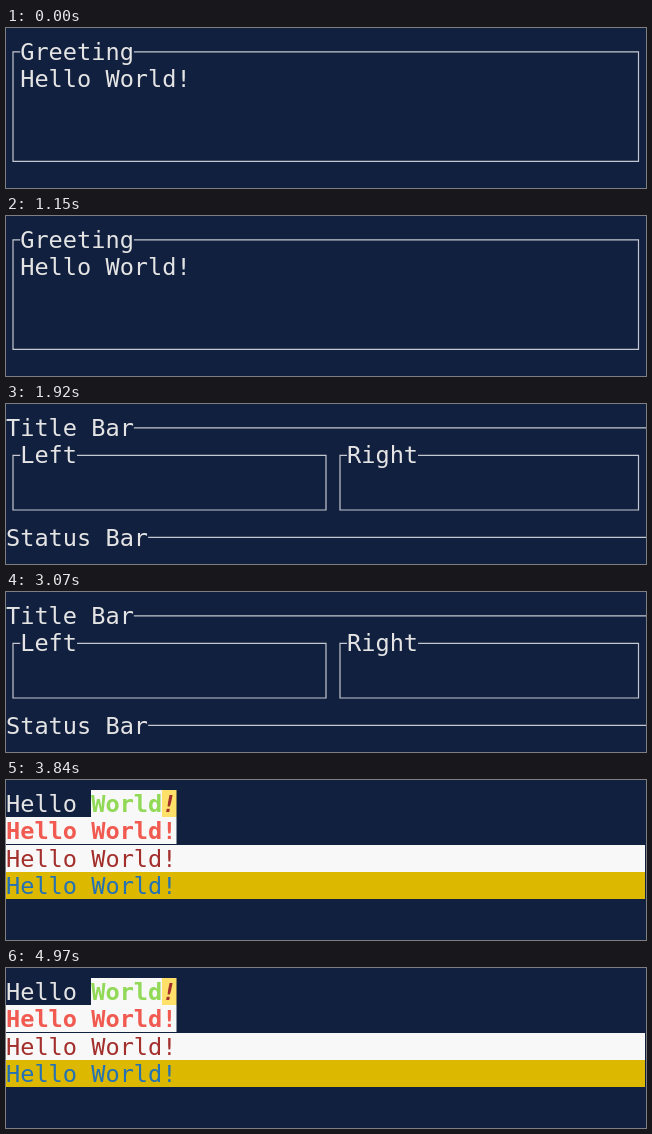
These frames come from a looping animation (640 px wide and 160 px high, 5720 ms). An HTML page:

```html
<!DOCTYPE html>
<html lang="en">
<head>
<meta charset="utf-8">
<style>
  html, body { margin: 0; height: 100%; overflow: hidden; background: #12203f; }
  svg { display: block; }
  text { font: 23.6px "DejaVu Sans Mono", monospace; fill: #e4e4e4; white-space: pre; }
  .bold { font-weight: bold; }
  .frame { fill: none; stroke: #c3c7cf; stroke-width: 1.2; }
</style>
</head>
<body>
<svg id="stage" width="640" height="160" viewBox="0 0 640 160"></svg>
<script>
const CELL = 14.21, ROW = 27.4, TOP = 10;
const LOOP = 5720, STARTS = [0, 1920, 3840];

const text = (col, row, str, color = '#e4e4e4', attrs = '') =>
  `<text x="${col * CELL}" y="${TOP + row * ROW + 22}" style="fill:${color}" ${attrs}>${str}</text>`;

const fill = (x, row, width, color, rows = 1) =>
  `<rect x="${x}" y="${Math.round(TOP + row * ROW)}" width="${width}" height="${Math.round(rows * ROW)}" fill="${color}"/>`;

const rule = d => `<path class="frame" d="${d}"/>`;

// Box whose top edge is interrupted by its label
const box = (left, top, right, bottom, col, row, label) =>
  rule(`M${col * CELL} ${top}H${left}V${bottom}H${right}V${top}H${(col + label.length) * CELL}`) +
  text(col, row, label);

const heading = (row, y, label) =>
  text(0, row, label) + rule(`M${label.length * CELL} ${y}H640`);

const BOLD = 'class="bold"';
const scenes = [
  box(7, 23.8, 632.5, 133.3, 1, 0, 'Greeting') + text(1, 1, 'Hello World!'),

  heading(0, 23.8, 'Title Bar') +
  box(7, 51.3, 320, 106, 1, 1, 'Left') +
  box(334, 51.3, 632.5, 106, 24, 1, 'Right') +
  heading(4, 133.3, 'Status Bar'),

  fill(85, 0, 71, '#f8f8f8') + fill(156, 0, 14.5, '#ffe169') +
  fill(0, 1, 170.5, '#f8f8f8') + fill(0, 2, 639, '#f8f8f8') + fill(0, 3, 639, '#dcb800') +
  text(0, 0, 'Hello') + text(6, 0, 'World', '#91d957', BOLD) +
  text(11, 0, '!', '#a32f2d', 'class="bold" font-style="italic" style="font-style:italic"') +
  text(0, 1, 'Hello World!', '#f05a50', BOLD) +
  text(0, 2, 'Hello World!', '#a32f2d') +
  text(0, 3, 'Hello World!', '#2472b5'),
];

const stage = document.getElementById('stage');
stage.innerHTML = scenes.map(s => `<g>${s}</g>`).join('');
stage.querySelectorAll('[font-style]').forEach(t => t.style.fontStyle = 'italic');

function draw() {
  const time = performance.now() % LOOP;
  const current = STARTS.findLastIndex(start => time >= start);
  [...stage.children].forEach((g, i) => g.style.display = i === current ? '' : 'none');
  requestAnimationFrame(draw);
}
draw();
</script>
</body>
</html>
```
